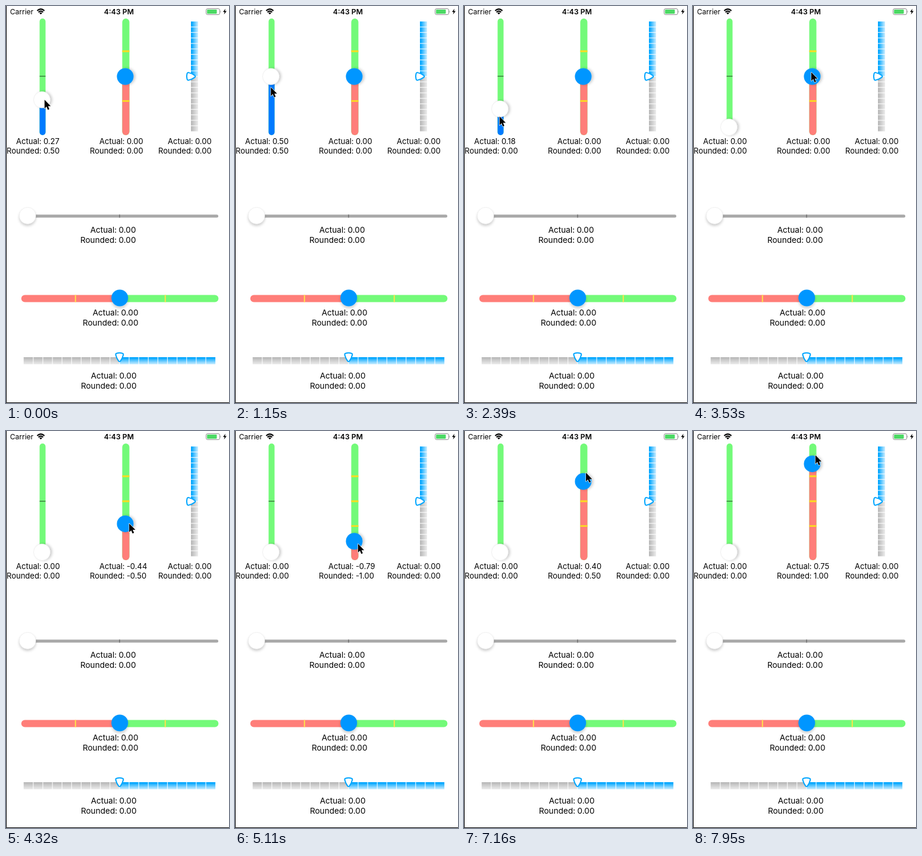
These frames come from a looping animation (375x667 px, 8 s). An HTML page:

```html
<!DOCTYPE html>
<html lang="en">
<head>
<meta charset="utf-8">
<title>Sliders</title>
<style>
  html, body { margin: 0; width: 100%; height: 100%; overflow: hidden; background: #fff; }
  svg { display: block; width: 375px; height: 667px; }
  text { font-family: Inter, Roboto, sans-serif; fill: #000; }
</style>
</head>
<body>
<svg id="stage" viewBox="0 0 375 667" xmlns="http://www.w3.org/2000/svg">
  <defs>
    <linearGradient id="blue" x2="0" y2="1">
      <stop offset=".1" stop-color="#00a6ff"/><stop offset="1" stop-color="#cdeeff"/>
    </linearGradient>
    <linearGradient id="grey" x2="0" y2="1">
      <stop offset=".1" stop-color="#bababa"/><stop offset="1" stop-color="#ececec"/>
    </linearGradient>
    <filter id="side" x="-50%" y="-50%" width="200%" height="200%">
      <feDropShadow dx="3" dy="0" stdDeviation="2" flood-opacity=".2"/>
    </filter>
    <filter id="below" x="-50%" y="-50%" width="200%" height="200%">
      <feDropShadow dx="0" dy="3" stdDeviation="2" flood-opacity=".2"/>
    </filter>
    <clipPath id="clipA"><rect x="56.5" y="21" width="10" height="196" rx="5"/></clipPath>
    <clipPath id="clipB"><rect x="195.5" y="21" width="12" height="196" rx="6"/></clipPath>
    <clipPath id="clipH"><rect x="25.7" y="485.5" width="331.6" height="12" rx="6"/></clipPath>
  </defs>
  <rect width="375" height="667" fill="#fff"/>

  <g id="status">
    <text x="6.8" y="13.6" font-size="12">Carrier</text>
    <text x="189.9" y="13.6" font-size="12.2" font-weight="600" text-anchor="middle">4:43 PM</text>
    <path d="M52.4 8.1Q58.5 2.3 64.6 8.1M54.6 10.5Q58.5 6.9 62.4 10.5" fill="none" stroke="#000" stroke-width="2.1"/>
    <path d="M58.5 14.2L56.1 11.7Q58.5 9.8 60.9 11.7Z"/>
    <rect x="336.5" y="4.5" width="23" height="10" rx="2.6" fill="none" stroke="#8c8c8c"/>
    <rect x="338" y="6" width="16.5" height="7" rx="1.2" fill="#4cd964"/>
    <path d="M360.6 7.6Q362.4 9.5 360.6 11.4Z" fill="#8c8c8c"/>
    <path d="M369 4.6L365 10H367.6L366.6 14.2L371 8.6H368.2Z"/>
  </g>

  <g clip-path="url(#clipA)">
    <rect x="56" y="21" width="12" height="196" fill="#73fa79"/>
    <rect id="fillA" x="56" width="12" height="200" fill="#007aff"/>
    <rect x="56" y="117" width="12" height="2" opacity=".38"/>
  </g>
  <circle id="thumbA" cx="60.5" r="14" fill="#fff" stroke="#000" stroke-opacity=".12" stroke-width=".5" filter="url(#side)"/>

  <g clip-path="url(#clipB)">
    <rect x="195" y="21" width="13" height="196" fill="#73fa79"/>
    <rect id="fillB" x="195" width="13" height="200" fill="#ff7e79"/>
    <path d="M195 76H208M195 118H208M195 159.6H208" stroke="#fbdc20" stroke-width="2.8"/>
  </g>
  <circle id="thumbB" cx="200.5" r="14" fill="#0096ff" filter="url(#side)"/>

  <rect x="24" y="350.5" width="333" height="5" rx="2.5" fill="#a8a8a8"/>
  <rect x="190" y="350.5" width="2" height="5" fill="#7d7d7d"/>
  <circle cx="36.3" cy="352.3" r="14" fill="#fff" stroke="#000" stroke-opacity=".12" stroke-width=".5" filter="url(#below)"/>

  <g clip-path="url(#clipH)">
    <rect x="25" y="485" width="166.5" height="13" fill="#ff7e79"/>
    <rect x="191.5" y="485" width="167" height="13" fill="#73fa79"/>
    <path d="M116.8 485V498M267.8 485V498" stroke="#ffe24a" stroke-width="2"/>
  </g>
  <circle cx="191.3" cy="490.5" r="14" fill="#0096ff" filter="url(#below)"/>

  <g id="meters"></g>
  <g id="labels"></g>
  <path d="M.5 0V666.5H375" fill="none" stroke="#000"/>
  <g id="cursor">
    <path transform="translate(.8 .6)" d="M0 0V14.6L3.3 11.5L5.6 16.8L8.1 15.7L5.9 10.6H10.4Z"
          stroke="#fff" stroke-width="1.3" stroke-linejoin="round" paint-order="stroke"/>
  </g>
</svg>
<script>
const NS = "http://www.w3.org/2000/svg";
const LOOP = 8000, TICK = 88.2;
const $ = id => document.getElementById(id);

function add(parent, tag, attrs, content) {
  const node = document.createElementNS(NS, tag);
  for (const key in attrs) node.setAttribute(key, attrs[key]);
  if (content) node.textContent = content;
  parent.appendChild(node);
  return node;
}

// Segmented bar, half grey and half blue, with a pointer in the middle.
function meter(transform, length) {
  const g = add($("meters"), "g", { transform }), half = length / 2;
  add(g, "rect", { width: half, height: 12, fill: "url(#grey)" });
  add(g, "rect", { x: half, width: half, height: 12, fill: "url(#blue)" });
  for (let i = 1; i < 20; i++)
    add(g, "rect", { x: length * i / 20 - .6, width: 1.2, height: 12, fill: "#fff", opacity: .85 });
  add(g, "path", {
    transform: `translate(${half} 0)`,
    d: "M-6.4-4Q-6.7-6-4.6-6.5Q0-7.9 4.6-6.5Q6.7-6 6.4-4Q5 2 1.6 6.4Q0 8.3-1.6 6.4Q-5 2-6.4-4Z",
    fill: "#fff", stroke: "#00a6ff", "stroke-width": 2
  });
}

// Two-line readout; returns the value texts.
function readout(x, y, size, gap) {
  return ["Actual:", "Rounded:"].map((name, i) => {
    const row = { y: y + i * gap, "font-size": size };
    add($("labels"), "text", { ...row, x, "text-anchor": "end" }, name);
    return add($("labels"), "text", { ...row, x: x + 3.3 }, "0.00");
  });
}

meter("translate(311 210.5) rotate(-90)", 184.5);
meter("translate(29.7 590)", 322.4);
const [readA, readB] = [59.6, 199.6, 314.6].map(x => readout(x, 231.7, 13, 16));
readout(186.2, 380.7, 13.6, 17);
readout(190.2, 519.7, 13.6, 17);
readout(187.2, 625.7, 13.6, 17);

const easeOut = t => Math.sin(t * Math.PI / 2);
const easeIn = t => t ** 1.7;
const nearest = v => Math.round(v * 2) / 2;

// A track is a start point plus moves; times are in ticks.
const move = (from, until, to, ease = easeOut) => ({ from, until, to, ease });
const snap = (tick, v) => move(tick, tick, [nearest(v)]);

const sliderA = { start: [.27], moves: [
  move(0, 3, [.32]), snap(6, .32), move(16.5, 27, [.18]), snap(30, .18)
] };
const sliderB = { start: [0], moves: [
  move(43.5, 58, [-.79]), snap(64, -.79), move(70, 79, [.26], easeIn), move(79, 90, [.75])
] };
const pointer = { start: [64, 157], moves: [
  move(0, 3, [63, 150]), move(12, 15, [56, 122]), move(16, 27, [59, 185]),
  move(33, 42, [207, 106]), move(43, 58, [206, 189]),
  move(69, 79, [204, 81], easeIn), move(79, 90, [205, 40])
] };

function sample({ start, moves }, n) {
  return moves.filter(m => n >= m.from).reduce((pos, m) => {
    const t = n >= m.until ? 1 : m.ease((n - m.from) / (m.until - m.from));
    return pos.map((v, i) => v + (m.to[i] - v) * t);
  }, start);
}

function setSlider(id, read, value, y) {
  $("fill" + id).setAttribute("y", y);
  $("thumb" + id).setAttribute("cy", y);
  read[0].textContent = value.toFixed(2);
  read[1].textContent = nearest(value).toFixed(2);
}

function draw(ms) {
  const n = Math.floor((ms % LOOP + 6) / TICK);
  const [a] = sample(sliderA, n), [b] = sample(sliderB, n), [x, y] = sample(pointer, n);
  setSlider("A", readA, a, 203.5 - 170 * a);
  setSlider("B", readB, b, 118.5 - 84.5 * b);
  $("cursor").setAttribute("transform", `translate(${x} ${y})`);
}

const start = performance.now();
function frame() {
  draw(performance.now() - start);
  requestAnimationFrame(frame);
}
frame();
</script>
</body>
</html>
```
